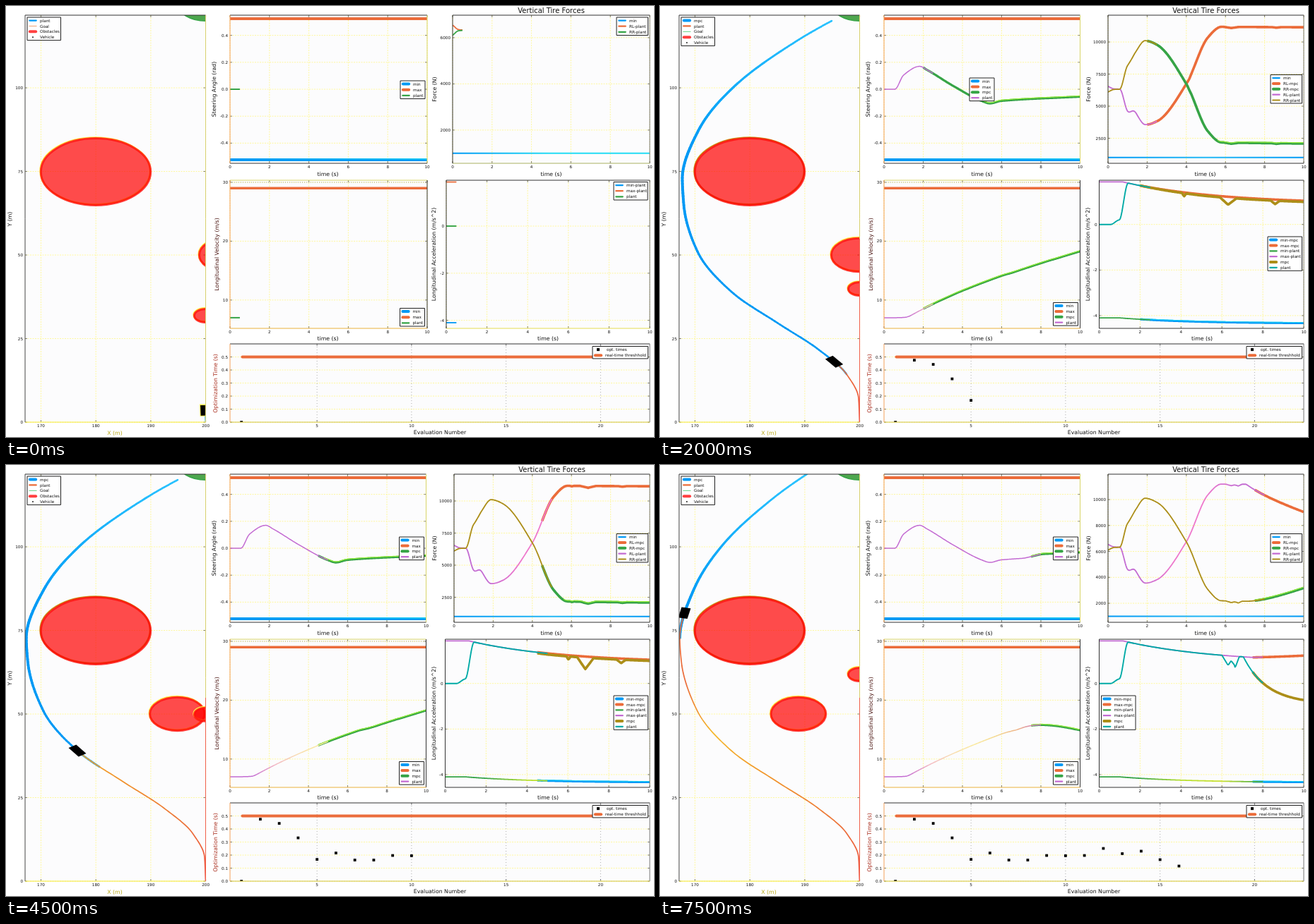
Animation of 917 by 611 pixels, one loop 8000 ms. Source, as an HTML page with a canvas:

```html
<!DOCTYPE html>
<html lang="en">
<head>
<meta charset="utf-8">
<title>Vehicle control simulation</title>
<style>
html, body { margin: 0; width: 100%; height: 100%; overflow: hidden; background: #fff; }
canvas { display: block; width: 917px; height: 611px; }
</style>
</head>
<body>
<canvas id="stage" width="917" height="611"></canvas>
<script>
const g = document.getElementById('stage').getContext('2d');
const STEP = 500, STEPS = 16;
const BLUE = '#0099f5', CYAN = '#22dcf5', ORANGE = '#eb6c3a', GREEN = '#36a446',
  PURPLE = '#c36bd2', GOLD = '#ac8e18', TEAL = '#00aaa6', LIME = '#94ee38',
  YELLOW = '#fff04a', GRID = '#fff786', DARK = '#333', WARM = '#f3a05a';

const ramp = (t, a, b) => Math.min(1, Math.max(0, (t - a) / (b - a)));
const ease = (t, a, b) => { const s = ramp(t, a, b); return s * s * (3 - 2 * s); };
const bell = (t, c, w) => Math.exp(-(((t - c) / w) ** 2));
const dip = (t, c, w) => Math.max(0, 1 - Math.abs(t - c) / w);
const settle = (t, start, tau) => 1 - Math.exp(-Math.max(0, t - start) / tau);
const flat = v => () => v;

// Monotone cubic through [t, value] points.
function curve(pts) {
  const n = pts.length, d = [], m = [];
  for (let i = 0; i < n - 1; i++) d.push((pts[i + 1][1] - pts[i][1]) / (pts[i + 1][0] - pts[i][0]));
  for (let i = 0; i < n; i++) {
    const a = d[i - 1], b = d[i];
    m.push(a === undefined ? b : b === undefined ? a : a * b <= 0 ? 0 : 2 * a * b / (a + b));
  }
  return t => {
    let i = 0;
    while (i < n - 2 && t > pts[i + 1][0]) i++;
    const h = pts[i + 1][0] - pts[i][0], s = ramp(t, pts[i][0], pts[i + 1][0]), r = 1 - s;
    return r * r * (1 + 2 * s) * pts[i][1] + s * s * (3 - 2 * s) * pts[i + 1][1]
      + h * s * r * (r * m[i] - s * m[i + 1]);
  };
}
function integral(f, start) {
  const dt = .02, sums = [start];
  for (let i = 0; i < 510; i++) sums.push(sums[i] + f((i + .5) * dt) * dt);
  return t => sums[Math.round(t / dt)];
}

// Acceleration limits, and the acceleration actually driven.
const topAcc = t => .9 + .97 * (1 - settle(t, 1.15, 4.6));
const lowAcc = t => -4.1 - .25 * settle(t, 1, 3.5);
const drivenAcc = t => .2 * ease(t, .55, 1) + (topAcc(t) - .2) * ease(t, .98, 1.42)
  - .42 * dip(t, 6.3, .3) - .5 * dip(t, 6.65, .2) - 1.9 * settle(t, 7.05, 1.1);
// Every solve places its dips a little later.
const plannedAcc = k => t => t < 1.8 ? drivenAcc(t) : topAcc(t)
  - .05 * ramp(t, 2, 5) * ease(k, 2, 4)
  - (.4 + .2 * Math.cos((k - 2) * Math.PI / 3)) * dip(t, 6.3 + .55 * ease(k, 4, 6), .4)
  - .14 * dip(t, 2.65 + .375 * k, .1)
  - .15 * ease(k, 2, 4) * dip(t, 8.6, .22);

const steer = curve([[0, 0], [.55, 0], [1, .105], [1.82, .17], [2.2, .143], [3.5, .027], [5, -.088], [5.4, -.105], [6, -.086], [10, -.055]]);
const drivenSteer = t => steer(t) + .025 * ease(t, 7, 8.2);

// Load moved sideways; the total rear load follows the acceleration.
const shiftLoad = curve([[0, -220], [.3, -25], [.6, 0], [1, 1780], [1.3, 2150], [1.9, 3270], [2.5, 2980], [4, 0], [5.1, -3650], [5.8, -4500], [10, -4530]]);
const drivenLoad = t => shiftLoad(t) + 1600 * ramp(t, 7.05, 10);
const rearForce = (acc, load, side) => t => (12650 + 590 * acc(t)) / 2 + side * load(t);

const route = [[0, 282.5, 590], [1, 281, 556], [2, 264, 522], [3, 223, 486], [4, 165, 448.5], [5, 101, 405],
  [6, 53, 349], [7, 30.5, 281], [7.5, 28, 245], [8.5, 52, 179], [10, 103, 116], [12, 196, 48], [14, 290, -4]];
const [routeX, routeY] = [1, 2].map(i => curve(route.map(p => [p[0], p[i]])));

const SOLVE = [0, .475, .443, .332, .167, .216, .162, .162, .197, .195, .197, .251, .211, .23, .165, .116];

function line(x0, y0, x1, y1, color, w = 1, dash = []) {
  g.strokeStyle = color; g.lineWidth = w; g.setLineDash(dash);
  g.beginPath(); g.moveTo(x0, y0); g.lineTo(x1, y1); g.stroke(); g.setLineDash([]);
}
function text(s, x, y, size = 5.7, align = 'center', color = '#111', turn = 0) {
  g.save(); g.translate(x, y); g.rotate(turn);
  g.font = size + 'px "DejaVu Sans", sans-serif';
  g.textAlign = align; g.fillStyle = color;
  g.fillText(s, 0, size * .36); g.restore();
}
const upright = (s, x, y, color) => text(s, x, y, 7.75, 'center', color, -Math.PI / 2);
const label = (s, x, y, color) => text(s, x, y, 7.75, 'center', color);

const axis = (l, t, r, b, xa, xs, ya, ys) => ({ l, t, r, b, X: v => xa + xs * v, Y: v => ya - ys * v });
const timeAxis = (l, t, r, b, ya, ys) => axis(l, t, r, b, l, (r - l) / 10, ya, ys);
function clipped(ax, draw) {
  g.save(); g.beginPath(); g.rect(ax.l, ax.t, ax.r - ax.l, ax.b - ax.t); g.clip(); draw(); g.restore();
}
// Numbers from a to b.
const range = (a, b, step) => Array.from({ length: Math.round((b - a) / step) + 1 }, (_, i) => a + i * step);
function grid(ax, xt, yt, digits = 0, vert = GRID) {
  g.fillStyle = '#fcfcfd'; g.fillRect(ax.l, ax.t, ax.r - ax.l, ax.b - ax.t);
  for (const v of xt) {
    const x = ax.X(v);
    line(x, ax.t, x, ax.b, vert, .8, vert === GRID ? [2, 1.5] : [1, 3]);
    line(x, ax.b, x, ax.b - 3, DARK, .6);
    line(x, ax.t, x, ax.t + 3, DARK, .6);
    text(String(v), x, ax.b + 5);
  }
  for (const v of yt) {
    const y = ax.Y(v);
    line(ax.l, y, ax.r, y, GRID, .8, [2, 1.5]);
    line(ax.l, y, ax.l + 3, y, DARK, .6);
    line(ax.r, y, ax.r - 3, y, DARK, .6);
    text(v.toFixed(digits).replace(/^-(0\.0)$/, '$1'), ax.l - 3, y, 5.7, 'right');
  }
}
function frame(ax, top = DARK, right = DARK, bottom = DARK, left = DARK) {
  line(ax.l, ax.t, ax.r, ax.t, top); line(ax.r, ax.t, ax.r, ax.b, right);
  line(ax.l, ax.b, ax.r, ax.b, bottom); line(ax.l, ax.t, ax.l, ax.b, left);
}
function plot(ax, f, a, b, color, w, dy = 0) {
  clipped(ax, () => {
    g.strokeStyle = color; g.lineWidth = w; g.lineJoin = 'round';
    g.beginPath();
    const n = Math.ceil((b - a) / .04);
    for (let i = 0; i <= n; i++) {
      const t = a + (b - a) * i / n;
      g.lineTo(ax.X(t), ax.Y(f(t)) + dy);
    }
    g.stroke();
  });
}
// Green prediction with its bright upper edge.
function plotGreen(ax, f, a, w, bright = a) {
  plot(ax, f, a, 10, GREEN, w);
  plot(ax, f, Math.max(a, bright), 10, LIME, 1.2, -w * .36);
}
function fade(x0, y0, x1, y1, ...stops) {
  const f = g.createLinearGradient(x0, y0, x1, y1);
  stops.forEach((c, i) => f.addColorStop(i / (stops.length - 1), c));
  return f;
}
function legend(x, y, w, rows) {
  const pitch = rows.length < 4 ? 8.1 : 7.85;
  g.fillStyle = '#fff'; g.strokeStyle = '#222'; g.lineWidth = 1;
  g.beginPath(); g.rect(x, y, w, rows.length * pitch + 1.2); g.fill(); g.stroke();
  rows.forEach(([name, color, width, dot = 0], i) => {
    const cy = y + 4.6 + i * pitch;
    g.lineCap = 'round';
    if (width) line(x + 2.5 + width / 3, cy, x + 13.5 - width / 3, cy, color, width);
    g.lineCap = 'butt';
    g.fillStyle = color; g.fillRect(x + 8 - dot / 2, cy - dot / 2, dot, dot);
    text(name, x + (dot > 2 ? 20 : 18), cy, 5.7, 'left');
  });
}
function ellipse(x, y, rx, ry, glow) {
  const path = (dx, dy) => { g.beginPath(); g.ellipse(x + dx, y + dy, rx, ry, 0, 0, 7); };
  path(-.8, -1.2); g.strokeStyle = glow; g.lineWidth = 2.5; g.stroke();
  path(0, 0); g.fillStyle = 'rgba(255,0,0,.7)'; g.fill();
  g.strokeStyle = 'rgba(255,10,10,.78)'; g.lineWidth = 3; g.stroke();
}

const evens = range(0, 10, 2);
const thick = (name, color) => [name, color, 4], thin = (name, color) => [name, color, 2.2];

function drawMap({ k, now, next, last }) {
  const ax = axis(27, 13, 282.5, 590, -1271.4, 7.77, 590, 4.74);
  // The last solve bends the route less after its leftmost point.
  const px = t => last && t > 7.5 ? 28 + .78 * (routeX(t) - 28) : routeX(t);
  const py = routeY;
  grid(ax, range(170, 200, 10), range(0, 100, 25));
  clipped(ax, () => {
    g.fillStyle = '#4ea64e'; g.strokeStyle = GREEN; g.lineWidth = 1.5;
    g.beginPath(); g.ellipse(282.5, -2.5, 39, 23.7, 0, 0, 7); g.fill(); g.stroke();
    ellipse(127, 235, 77.7, 47.4, k ? '#c8a020' : YELLOW);
    ellipse(312.3 - 7.76 * k, 353, 38.9, 23.7, YELLOW);
    ellipse(282, 439 - 9.47 * k, 15.6, 9.5, YELLOW);
    if (k) {
      const at = t => [px(t) + 4 * bell(k, 5, 3) * bell(t, 7.4, 1), py(t)];
      const end = last ? 14 : 13;
      g.strokeStyle = fade(0, 13, 0, 200, '#2cc4ff', BLUE);
      g.lineCap = 'round';
      for (let t = now; t < end; t += .06) {
        g.lineWidth = 2.4 + 1.6 * bell(py(t), 235, 140);
        g.beginPath(); g.moveTo(...at(t)); g.lineTo(...at(Math.min(end, t + .06))); g.stroke();
      }
    }
    g.strokeStyle = k ? fade(0, 590, 0, 240, '#f04a3a', ORANGE, '#f0902c', '#f5b82c', ORANGE, ORANGE) : BLUE;
    g.lineWidth = 1.7; g.beginPath();
    for (let t = 0; t <= next + .001; t += .05) g.lineTo(px(t), py(t));
    g.stroke();

    // Vehicle box, turned in metres and then scaled to the axes.
    const vx = (px(next + .05) - px(next - .05)) / 7.77, vy = (py(next - .05) - py(next + .05)) / 4.74;
    const len = Math.hypot(vx, vy), hx = vx / len, hy = vy / len;
    g.beginPath();
    for (const [a, b] of [[1, 1], [1, -1], [-1, -1], [-1, 1]]) {
      const dx = 1.6 * a * hx + .85 * b * hy, dy = 1.6 * a * hy - .85 * b * hx;
      g.lineTo(px(next) + 7.77 * dx, py(next) - 4.74 * dy);
    }
    g.closePath();
    if (!k) { g.strokeStyle = YELLOW; g.lineWidth = 2; g.stroke(); }
    g.fillStyle = '#000'; g.fill();
  });
  frame(ax, DARK, '#d8d070', '#f4e83a', '#444');
  if (k) line(282.5, 330, 282.5, 590, '#f0604c');
  label('X (m)', 154, 605, '#b8a818');
  upright('Y (m)', 5, 302);
  legend(30, 16, 47.5, [...(k ? [thick('mpc', BLUE), thin('plant', ORANGE)] : [thin('plant', BLUE)]),
    ['Goal', k ? '#5fd080' : '#f0a070', 1], thick('Obstacles', '#ff4040'), ['Vehicle', '#000', 0, 1.6]]);
}

function limitsLegend(k, x, y) {
  legend(x, y, 35, [thick('min', BLUE), thick('max', ORANGE),
    ...(k ? [thick('mpc', GREEN), thin('plant', PURPLE)] : [thin('plant', GREEN)])]);
}

function drawSteer({ k, now, next, right, last }) {
  const ax = timeAxis(317, 13, right, 223, 118, 191);
  grid(ax, evens, range(-.4, .4, .2), 1);
  plot(ax, flat(-.5236), 0, 10, BLUE, 4);
  plot(ax, flat(-.5236), 0, 10, fade(317, 0, right, 0, BLUE, CYAN), 1.2, -1.2);
  plot(ax, flat(.5236), 0, 10, ORANGE, 4);
  if (k) plotGreen(ax, last ? drivenSteer : steer, now, 3.2, 4.8);
  plot(ax, drivenSteer, 0, next, k ? PURPLE : GREEN, k ? 1.5 : 2);
  frame(ax, DARK, '#d8d468', DARK, WARM);
  label('time (s)', 455.5, 238);
  upright('Steering Angle (rad)', 294, 118);
  limitsLegend(k, !k ? 558 : k < 5 ? 438 : 556.5, k ? 102 : 106);
}

function drawSpeed({ k, now, next, right, acc }) {
  const ax = timeAxis(317, 247, right, 457, 500.3, 8.345);
  grid(ax, evens, range(10, 30, 10));
  line(317, 250, right, 250, '#888', .8, [1, 2]);
  plot(ax, flat(29), 0, 10, ORANGE, 3.6);
  if (k) plotGreen(ax, integral(acc, 7), now, 3);
  const pale = fade(317, 0, 540, 0, PURPLE, PURPLE, '#f3b8c4', '#f8dcb0', '#faeaa0', '#f4d890', '#eeb088', PURPLE);
  plot(ax, integral(drivenAcc, 7), 0, next, k ? pale : GREEN, k ? 1.5 : 2);
  frame(ax, '#d8d468', DARK, '#e9b03c', WARM);
  label('time (s)', 455.5, 471);
  upright('Longitudinal Velocity (m/s)', 298, 352, '#4a1410');
  limitsLegend(k, k ? 556.5 : 557.5, k ? 420.5 : 428.5);
}

function drawForce({ k, now, next, acc, last }) {
  const l = k ? 634 : 632;
  const ax = timeAxis(l, 13, 911, 223, ...(!k ? [241.4, .03275] : last ? [232.8, .01838] : [233, .0182]));
  grid(ax, evens, !k ? range(2000, 6000, 2000) : last ? range(2000, 10000, 2000) : range(2500, 10000, 2500));
  plot(ax, flat(1000), 0, 10, fade(l, 0, 911, 0, BLUE, k ? '#22b8f5' : CYAN, k ? BLUE : CYAN), 2);
  if (k) {
    const load = last ? drivenLoad : shiftLoad;
    plot(ax, rearForce(acc, load, -1), now, 10, ORANGE, 3.6);
    plotGreen(ax, rearForce(acc, load, 1), now, 3.6, 5.6);
  }
  const pink = fade(l, 0, 911, 0, PURPLE, PURPLE, '#ee78cc', '#ee78cc', PURPLE, PURPLE, PURPLE);
  plot(ax, rearForce(drivenAcc, drivenLoad, -1), 0, next, k ? pink : ORANGE, 1.8);
  plot(ax, rearForce(drivenAcc, drivenLoad, 1), 0, next, k ? GOLD : GREEN, 1.8);
  frame(ax, DARK, '#777', k ? DARK : '#a8b060');
  text('Vertical Tire Forces', k ? 772.5 : 771.5, 6, 10);
  label('time (s)', 771.5, 238);
  upright('Force (N)', 606, 118);
  legend(864, k ? 97.5 : 16, 44.5, [thin('min', BLUE), ...(k
    ? [thick('RL-mpc', ORANGE), thick('RR-mpc', GREEN), thin('RL-plant', PURPLE), thin('RR-plant', GOLD)]
    : [thin('RL-plant', ORANGE), thin('RR-plant', GREEN)])]);
}

function drawAcc({ k, now, next, acc, last }) {
  const l = k ? 621.5 : 623;
  const ax = timeAxis(l, 247, 911, 457, ...(k ? [309.7, 32.3] : [312, 33.4]));
  const top = t => topAcc(t) + (last ? .18 * ramp(t, 7.5, 10) : 0);
  grid(ax, evens, range(-4, 0, 2));
  if (k) {
    plot(ax, lowAcc, now, 10, BLUE, 3);
    plot(ax, lowAcc, now, 10, CYAN, 1, -1);
    plot(ax, top, now, 10, ORANGE, 3.6);
  }
  plot(ax, lowAcc, 0, next, k ? fade(l, 0, 911, 0, GREEN, GREEN, '#b8e030', '#c8e030', GREEN, GREEN) : BLUE, 1.8);
  plot(ax, top, 0, next, k ? PURPLE : ORANGE, 1.8);
  if (k) plot(ax, acc, now, 10, GOLD, 3.6);
  plot(ax, drivenAcc, 0, next, k ? TEAL : GREEN, 1.9);
  frame(ax, DARK, '#777', k ? DARK : '#e4da50');
  label('time (s)', 767, 471);
  upright('Longitudinal Acceleration (m/s^2)', 605.5, 352);
  const plants = (a, b, c) => [thin('min-plant', a), thin('max-plant', b), ...(k ? [thick('mpc', GOLD)] : []), thin('plant', c)];
  if (!k) legend(860, 249.5, 48, plants(BLUE, ORANGE, GREEN));
  else legend(last ? 624.5 : 860, 327, 48.5, [thick('min-mpc', BLUE), thick('max-mpc', ORANGE), ...plants(GREEN, PURPLE, TEAL)]);
}

function drawTimes({ k }) {
  const ax = axis(317, 479, 911, 590, 306.4, 26.75, 590, 185);
  grid(ax, range(5, 20, 5), range(0, .5, .1), 1, '#999');
  g.lineCap = 'round';
  line(334.5, ax.Y(.5), 841, ax.Y(.5), ORANGE, 4);
  g.lineCap = 'butt';
  clipped(ax, () => {
    g.fillStyle = '#000';
    SOLVE.slice(0, k + 1).forEach((v, i) => g.fillRect(ax.X(i + 1) - 1.9, ax.Y(v) - 1.9, 3.8, 3.8));
  });
  frame(ax, DARK, '#777', '#d2c440', WARM);
  label('Evaluation Number', 614, 604.5);
  upright('Optimization Time (s)', 296, 535, '#a82c1c');
  legend(830, 482.5, 78.5, [['opt. times', '#000', 0, 4], thick('real-time threshhold', ORANGE)]);
}

// One solve: the plan starts at `now`, the driven part reaches `next`.
function draw(k) {
  const now = k / 2, last = k === STEPS - 1, planned = plannedAcc(k);
  const state = {
    k, now, next: now + .5, last, right: k ? 594.5 : 596,
    acc: t => t < now || last ? drivenAcc(t) : planned(t)
  };
  g.fillStyle = '#fff'; g.fillRect(0, 0, 917, 611);
  for (const part of [drawMap, drawSteer, drawSpeed, drawForce, drawAcc, drawTimes]) part(state);
}

let shown = -1;
function tick() {
  const k = Math.floor(performance.now() / STEP) % STEPS;
  if (k !== shown) draw(shown = k);
  requestAnimationFrame(tick);
}
tick();
</script>
</body>
</html>
```
